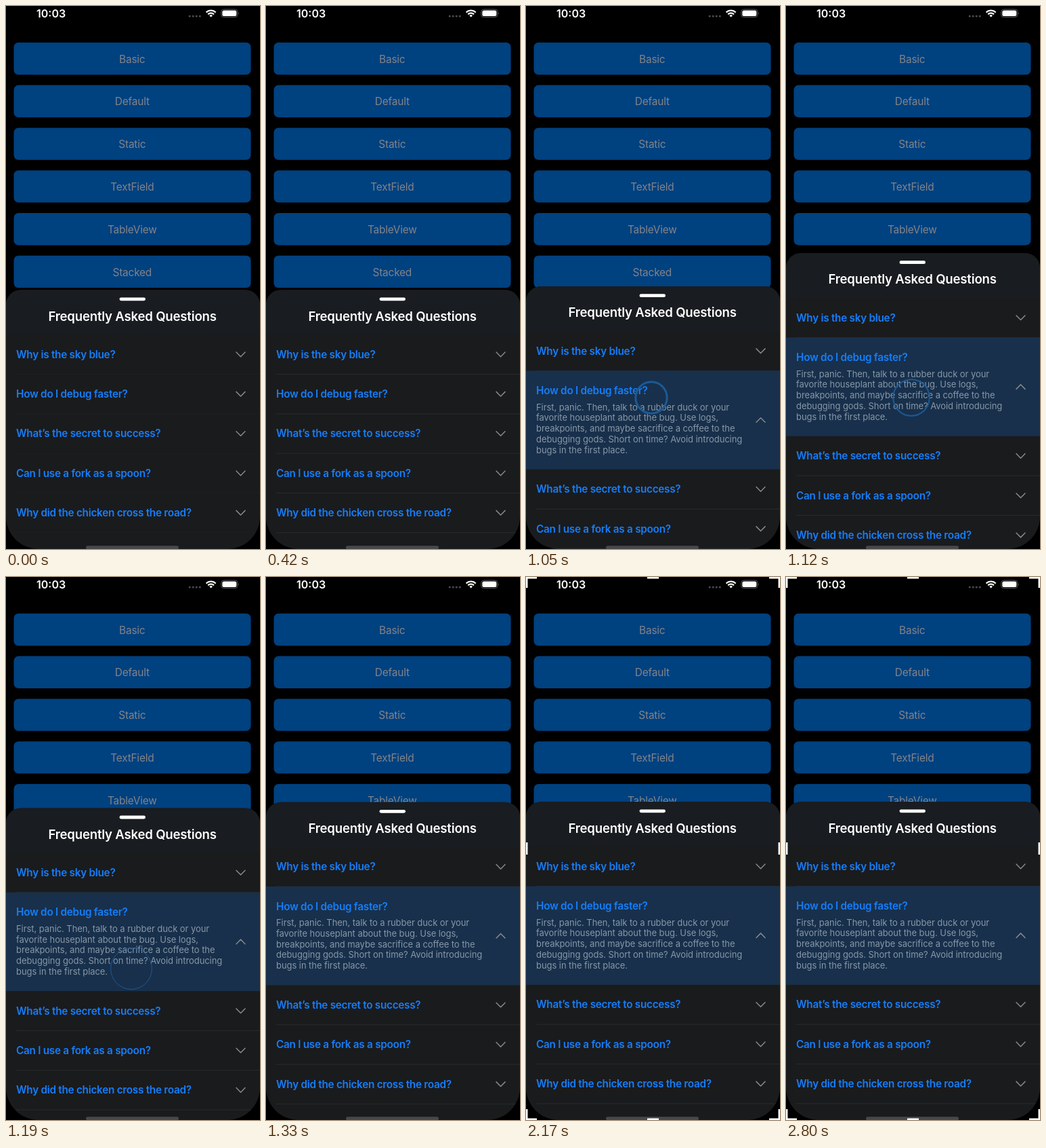
These frames come from a looping animation (375x800 px, 3.01 s). An HTML page:

```html
<!DOCTYPE html>
<html lang="en">
<head>
<meta charset="utf-8">
<title>Bottom sheet FAQ</title>
<style>
  html, body { margin: 0; width: 100%; height: 100%; overflow: hidden; background: #000; }
  svg { display: block; width: 375px; height: 800px; font-family: Inter, Roboto, sans-serif; }
  .button rect { fill: #004180; }
  .button text { fill: #828488; font-size: 15.4px; letter-spacing: -.2px; text-anchor: middle; }
  .clock { fill: #fff; font-size: 16px; font-weight: 600; }
  .title { fill: #fff; font-size: 18.6px; font-weight: 600; letter-spacing: -.2px; text-anchor: middle; }
  .question { fill: #157efb; font-size: 15.3px; font-weight: 600; letter-spacing: -.27px; }
  .answer { fill: #8797a8; font-size: 13px; letter-spacing: -.065px; }
  .chevron { fill: none; stroke: #88888c; stroke-width: 1.5; stroke-linecap: round; stroke-linejoin: round; }
  .divider { stroke: #2a2b2e; stroke-width: 1; }
  .wifi { fill: none; stroke: #fff; stroke-width: 2.1; }
</style>
</head>
<body>
<svg viewBox="0 0 375 800">
  <rect width="375" height="800"/>

  <text class="clock" x="45" y="16.6">10:03</text>
  <g fill="#4c4c4e">
    <circle cx="271.2" cy="15" r="1.6"/><circle cx="276.2" cy="15" r="1.6"/>
    <circle cx="281.2" cy="15" r="1.6"/><circle cx="286.2" cy="15" r="1.6"/>
  </g>
  <path class="wifi" d="M295.6 9.4a10 10 0 0 1 14 0M298.2 12.2a6.2 6.2 0 0 1 8.8 0"/>
  <path d="M302.6 16.6l-2.3-2.5a3.3 3.3 0 0 1 4.6 0z" fill="#fff"/>
  <rect x="317.7" y="5" width="24.2" height="11.6" rx="3.8" fill="none" stroke="#59595b"/>
  <rect x="319.3" y="6.5" width="21" height="8.6" rx="2.5" fill="#fff"/>
  <path d="M343.2 9v3.8q1.6-1.9 0-3.8z" fill="#59595b"/>

  <g id="buttons"></g>

  <g id="sheet">
    <rect width="375" height="800" rx="22" fill="#1a1b1d"/>
    <path d="M0 66V22A22 22 0 0 1 22 0H353A22 22 0 0 1 375 22V66z" fill="#191c20"/>
    <rect x="167.5" y="11.2" width="38.5" height="4.8" rx="2.4" fill="#fff"/>
    <text class="title" x="186.6" y="45.4">Frequently Asked Questions</text>
    <g id="rows"></g>
  </g>

  <circle id="ring" cx="185" cy="577" fill="none" stroke="#1b5a97"/>
  <rect x="118" y="795.3" width="137" height="5" rx="2.5" fill="#48484b"/>
  <path d="M0 752A48 48 0 0 0 48 800H0zM375 752A48 48 0 0 1 327 800H375z"/>
  <path id="handles" fill="none" stroke="#fff" stroke-width="5"
    d="M0 16V0H16M359 0H375V16M375 784V800H359M16 800H0V784M179 0h17M179 800h17M0 391v18M375 391v18"/>
</svg>
<script>
  const LOOP = 3010, STEP = 70;
  const ROW = 58.33, HEADER = 66, GROWTH = 87, REST = 418.2;
  const TAP = 910, OPEN = 1050, SPRING_START = 1034, STIFFNESS = 0.0245;
  const HANDLES_AT = 2030;
  const $ = id => document.getElementById(id);

  $("buttons").innerHTML = ["Basic", "Default", "Static", "TextField", "TableView", "Stacked"]
    .map((label, i) => `<g class="button" transform="translate(0 ${53.8 + i * 62.8})">
      <rect x="11.5" width="350" height="47.4" rx="7"/>
      <text x="186.3" y="29.8">${label}</text></g>`).join("");

  const chevron = (id, y, dir) =>
    `<path id="${id}" class="chevron" d="M340 ${y - 3.3 * dir}l6.5 ${6.6 * dir}l6.5 ${-6.6 * dir}"/>`;

  const row = (question, i) => `<g transform="translate(0 ${HEADER + i * ROW})">
    <text class="question" x="15" y="34.6">${question}</text>
    ${chevron("chevron" + i, ROW / 2, 1)}
    <path class="divider" d="M15 ${ROW}H375"/></g>`;

  const questions = ["Why is the sky blue?", "How do I debug faster?", "What’s the secret to success?",
    "Can I use a fork as a spoon?", "Why did the chicken cross the road?"].map(row);

  const answer = ["First, panic. Then, talk to a rubber duck or your",
    "favorite houseplant about the bug. Use logs,",
    "breakpoints, and maybe sacrifice a coffee to the",
    "debugging gods. Short on time? Avoid introducing",
    "bugs in the first place."]
    .map((line, i) => `<text class="answer" x="15" y="${58.2 + i * 15.75}">${line}</text>`).join("");

  $("rows").innerHTML = `${questions[0]}
    <g id="detail" transform="translate(0 ${HEADER + ROW})">
      <rect width="375" height="${ROW + GROWTH}" fill="#18304b"/>
      ${answer}${chevron("up", (ROW + GROWTH) / 2, -1)}
    </g>
    ${questions[1]}<g id="lower">${questions.slice(2).join("")}</g>`;

  const dividers = document.querySelectorAll(".divider");
  const show = (el, on) => el.setAttribute("visibility", on ? "visible" : "hidden");

  // Critically damped spring, 0 to 1
  function spring(ms) {
    const x = Math.max(0, ms) * STIFFNESS;
    return 1 - (1 + x) * Math.exp(-x);
  }

  function draw(t) {
    const open = t >= OPEN;
    const top = REST - GROWTH * spring(t - SPRING_START);
    $("sheet").setAttribute("transform", `translate(0 ${top.toFixed(2)})`);
    $("lower").setAttribute("transform", `translate(0 ${open ? GROWTH : 0})`);
    show($("detail"), open);
    show($("chevron1"), !open);

    const clarity = Math.min(1, 0.3 + t / 400);
    dividers.forEach((line, i) => line.setAttribute("opacity", open && i === 1 ? 0 : clarity));

    const age = (t - TAP) / STEP;
    show($("ring"), age >= 0 && age <= 4);
    $("ring").setAttribute("r", Math.max(0, 16 + 3.6 * age));
    $("ring").setAttribute("stroke-width", Math.max(0, 5 - age));

    show($("handles"), t >= HANDLES_AT);
  }

  function tick() {
    const t = (performance.now() + 1) % LOOP;
    draw(Math.floor(t / STEP) * STEP);
    requestAnimationFrame(tick);
  }
  tick();
</script>
</body>
</html>
```
